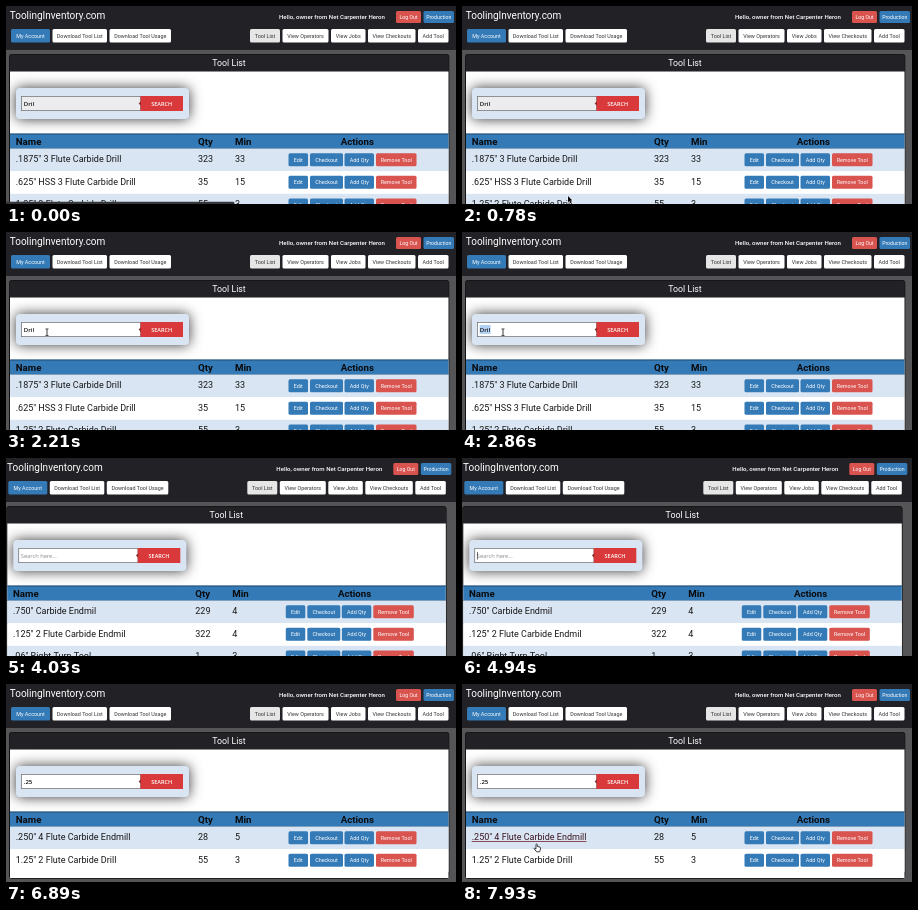
These frames come from a looping animation (450x198 px, 8 s). An HTML page with a canvas:

```html
<!DOCTYPE html>
<html lang="en">
<head>
<meta charset="utf-8">
<title>Tool List</title>
<style>
html, body { margin: 0; width: 100%; height: 100%; overflow: hidden; background: #555; }
canvas { display: block; width: 450px; height: 198px; }
</style>
</head>
<body>
<canvas id="stage"></canvas>
<script>
const W = 450, H = 198, LOOP = 8000, STEP = 130;
const CLICK = 2210, SELECT = 2730, CLEAR = 3380, DOT = 5460, TWO = 5720, FIVE = 5850;
const BLUE = '#337ab7', RED = '#d9534f', PALE = '#d9e5f3', DARK = '#222126';
const SANS = 'Roboto, Arial, sans-serif';
const FIELD = '"Open Sans", "Noto Sans", sans-serif';

const canvas = document.getElementById('stage');
const ctx = canvas.getContext('2d');
const scale = window.devicePixelRatio || 1;
canvas.width = W * scale;
canvas.height = H * scale;

const lists = {
  drill: [
    ['.1875" 3 Flute Carbide Drill', '323', '33'],
    ['.625" HSS 3 Flute Carbide Drill', '35', '15'],
    ['1.25" 2 Flute Carbide Drill', '55', '3']
  ],
  all: [
    ['.750" Carbide Endmil', '229', '4'],
    ['.125" 2 Flute Carbide Endmil', '322', '4'],
    ['.06" Right Turn Tool', '1', '3']
  ],
  quarter: [
    ['.250" 4 Flute Carbide Endmill', '28', '5'],
    ['1.25" 2 Flute Carbide Drill', '55', '3']
  ]
};

// label, left, right, fill, ink
const nav = [
  ['My Account', 5, 44, BLUE, '#fff'],
  ['Download Tool List', 46.5, 101, '#fff', '#333'],
  ['Download Tool Usage', 103.5, 165, '#fff', '#333'],
  ['Tool List', 244, 274, '#e6e6e6', '#333'],
  ['View Operators', 276.5, 322.5, '#fff', '#333'],
  ['View Jobs', 325, 359.5, '#fff', '#333'],
  ['View Checkouts', 362, 409.5, '#fff', '#333'],
  ['Add Tool', 412, 442.5, '#fff', '#333']
];
const actions = [
  ['Edit', 282.5, 302, BLUE, '#fff'],
  ['Checkout', 304, 337, BLUE, '#fff'],
  ['Add Qty', 338.5, 368, BLUE, '#fff'],
  ['Remove Tool', 370, 410.5, RED, '#fff']
];

// time, x, y of the pointer tip
const approach = [[780, 106, 190], [1040, 70, 122], [1300, 48, 94], [1560, 41, 87], [2080, 41, 100]];
const leave = [[7800, 60, 138], [7930, 74, 160]];

function rect(x, y, w, h, fill) {
  ctx.fillStyle = fill;
  ctx.fillRect(x, y, w, h);
}

function round(x, y, w, h, r, fill) {
  ctx.beginPath();
  ctx.roundRect(x, y, w, h, r);
  ctx.fillStyle = fill;
  ctx.fill();
}

function text(s, x, y, size, color, weight = 400, align = 'left', family = SANS) {
  ctx.font = `${weight} ${size}px ${family}`;
  ctx.textAlign = align;
  ctx.fillStyle = color;
  ctx.fillText(s, x, y);
}

function button([label, left, right, fill, ink], y, h, size = 5.4) {
  round(left, y, right - left, h, 1.5, fill);
  text(label, (left + right) / 2, y + h / 2 + size * 0.36, size, ink, 400, 'center');
}

function along(path, t) {
  if (t < path[0][0]) return null;
  for (let i = 1; i < path.length; i++) {
    const [t0, x0, y0] = path[i - 1], [t1, x1, y1] = path[i];
    if (t < t1) {
      const k = (t - t0) / (t1 - t0);
      return [x0 + (x1 - x0) * k, y0 + (y1 - y0) * k];
    }
  }
  return path[path.length - 1].slice(1);
}

function header() {
  text('ToolingInventory.com', 3.7, 13.2, 10, '#fff');
  text('Hello, owner from Net Carpenter Heron', 273, 13.2, 6.1, '#fff', 500);
  button(['Log Out', 390, 415, RED, '#fff'], 5, 12, 5.2);
  button(['Production', 417.5, 448, BLUE, '#fff'], 5, 12, 5.2);
  for (const b of nav) button(b, 23, 13.5);
}

function searchBox(t) {
  ctx.save();
  ctx.beginPath();
  ctx.rect(4, 65.5, 438.5, 62);
  ctx.clip();
  ctx.shadowColor = 'rgba(0,0,0,.8)';
  ctx.shadowBlur = 13 * scale;
  round(10, 82, 173, 31, 4, PALE);
  ctx.restore();

  const focus = t >= CLICK;
  rect(15, 90, 120, 15, '#77797c');
  rect(15.8, 90.8, 118.4, 13.4, focus ? '#fff' : '#ececee');
  const value = t < CLEAR ? 'Dril' : t < DOT ? '' : t < TWO ? '.' : t < FIVE ? '.2' : '.25';
  if (t >= SELECT && t < CLEAR) rect(17.6, 93, 11, 9, '#b3d1f3');
  if (value) text(value, 17.8, 99.7, 6, '#111', 600, 'left', FIELD);
  else text('Search here...', 17.5, 99.7, 5.7, '#8a8a8a', 400, 'left', FIELD);

  const typed = t < DOT ? CLEAR : t < TWO ? DOT : t < FIVE ? TWO : FIVE;
  if (t >= CLEAR && (t - typed) % 1200 < 600) {
    ctx.font = `600 6px ${FIELD}`;
    rect(18 + ctx.measureText(value).width, 94, 0.6, 7.5, '#111');
  }

  rect(134.5, 90, 42.5, 15, '#d9393a');
  ctx.beginPath();
  ctx.moveTo(135, 95.3);
  ctx.lineTo(132.6, 97.5);
  ctx.lineTo(135, 99.7);
  ctx.fillStyle = '#8e2a2c';
  ctx.fill();
  text('SEARCH', 155.7, 99.5, 5.5, '#fff', 600, 'center', FIELD);
}

function table(rows, hover) {
  rect(4, 127.6, 438.5, 15, BLUE);
  rect(4, 127.6, 438.5, 0.8, '#1c3f60');
  rect(4, 142, 438.5, 0.7, '#27587f');
  text('Name', 9.7, 138.6, 9.7, '#0b0b0d', 700);
  text('Qty', 192, 138.6, 9.7, '#0b0b0d', 700);
  text('Min', 229, 138.6, 9.7, '#0b0b0d', 700);
  text('Actions', 351.3, 138.6, 9.7, '#0b0b0d', 700, 'center');

  rows.forEach(([name, qty, min], i) => {
    const y = 142.6 + i * 22.6;
    const lit = hover && i === 0;
    const ink = lit ? '#3a1520' : '#161616';
    rect(4, y, 438.5, 22.6, i % 2 ? '#fff' : PALE);
    text(name, 9.7, y + 13.4, 9, ink);
    if (lit) rect(9.7, y + 14.4, ctx.measureText(name).width, 0.8, '#7a2430');
    text(qty, 192, y + 13.4, 9, '#161616');
    text(min, 229, y + 13.4, 9, '#161616');
    for (const b of actions) button(b, y + 4.6, 13);
  });
}

function panel(t, hover) {
  const rows = t < CLEAR ? lists.drill : t < FIVE ? lists.all : lists.quarter;
  const bottom = rows.length < 3 ? 194.8 : 210;
  round(3, 48, 440.3, bottom - 48, 3, '#111');
  round(3.7, 48.7, 439, 17, [2.5, 2.5, 0, 0], DARK);
  rect(4, 65.5, 438.5, bottom - 66.3, '#fff');
  text('Tool List', 223, 59.9, 8.8, '#fff', 400, 'center');
  searchBox(t);
  table(rows, hover);
}

function polygon(points) {
  ctx.beginPath();
  points.forEach(([x, y]) => ctx.lineTo(x, y));
  ctx.closePath();
}

function arrow(x, y) {
  ctx.save();
  ctx.translate(x, y);
  polygon([[0, 0], [0, 6.2], [1.4, 5], [2.4, 7.2], [3.4, 6.7], [2.5, 4.6], [4.4, 4.5]]);
  ctx.lineWidth = 1;
  ctx.strokeStyle = '#fff';
  ctx.stroke();
  ctx.fillStyle = '#000';
  ctx.fill();
  ctx.restore();
}

function beam(x, y) {
  rect(x - 0.4, y - 3, 0.8, 6.4, '#111');
  rect(x - 1.5, y - 3.4, 3, 0.7, '#111');
  rect(x - 1.5, y + 3, 3, 0.7, '#111');
}

function hand(x, y) {
  ctx.save();
  ctx.translate(x, y);
  polygon([[0, 0.4], [0.6, 0], [1.3, 0.5], [1.4, 2.5], [4, 3.1], [4.6, 3.8], [4.1, 6.6],
    [3.6, 7.8], [0.6, 7.8], [-1.8, 4.7], [-1.4, 4], [0, 4.9]]);
  ctx.fillStyle = '#fff';
  ctx.fill();
  ctx.lineWidth = 0.8;
  ctx.lineJoin = 'round';
  ctx.strokeStyle = '#111';
  ctx.stroke();
  ctx.restore();
}

function pointer(t) {
  const p = t < CLEAR ? along(approach, t) : along(leave, t);
  if (!p) return;
  const inField = p[0] > 15 && p[0] < 134 && p[1] > 91 && p[1] < 105;
  if (t >= 7930) hand(...p);
  else if (inField) beam(...p);
  else arrow(...p);
}

function draw(now) {
  const t = Math.floor((now % LOOP) / STEP) * STEP;
  ctx.setTransform(scale, 0, 0, scale, 0, 0);
  rect(0, 0, W, H, '#555557');
  rect(0, 0, W, 44, DARK);

  // the long list brings a scrollbar that nudges the page left
  ctx.save();
  ctx.translate(t >= CLEAR && t < FIVE ? -2.7 : 0, 0);
  header();
  panel(t, t >= 7930);
  ctx.restore();

  if (t < 650) round(-2, 195.8, 230.5, 6, 1.5, '#35363a');
  pointer(t);
}

const start = performance.now();
function tick() {
  draw(performance.now() - start);
  requestAnimationFrame(tick);
}
tick();
</script>
</body>
</html>
```
